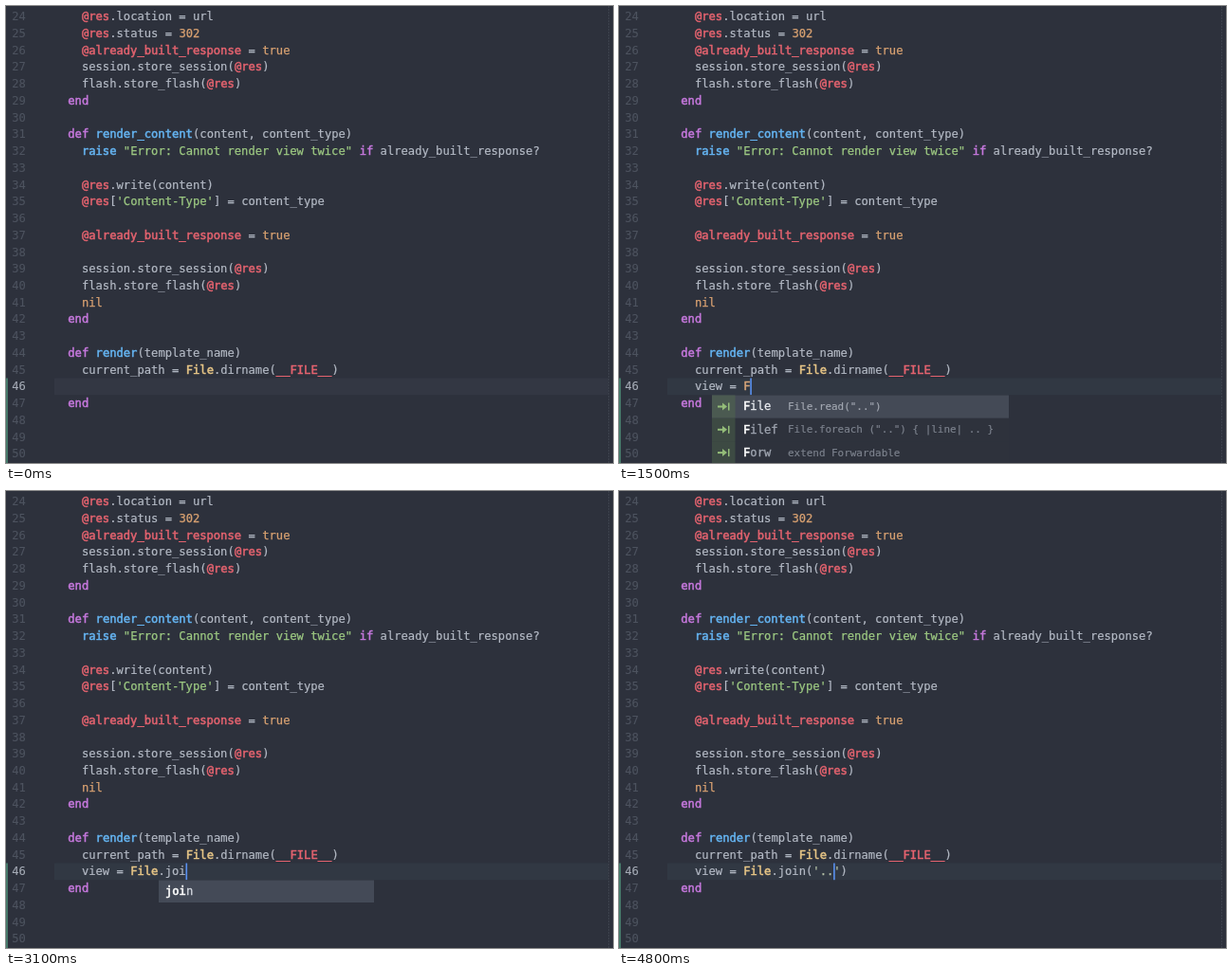
Animation of 640 by 482 pixels, one loop 4.9 s. Source, as an HTML page with a canvas:

```html
<!DOCTYPE html>
<html lang="en">
<head>
<meta charset="utf-8">
<title>Typing in a code editor</title>
<style>
html, body { margin: 0; width: 100%; height: 100%; overflow: hidden; background: #2d313c; }
canvas { display: block; }
</style>
</head>
<body>
<canvas id="stage" width="640" height="482"></canvas>
<script>
const ctx = document.getElementById('stage').getContext('2d');
const LOOP = 4900, CHAR = 7.318, ROW = 17.73, LEFT = 65.3, FIRST = 24, ACTIVE = 46;
const PLAIN = '#b4bac5';
const COLORS = { ivar: '#e4636f', str: '#9dc982', key: '#c678dd', cls: '#e9c787', lit: '#d8a171', fn: '#65b5f3' };
const TOKEN = /(?<ivar>@\w+|__FILE__)|(?<str>".*?"|'.*?')|(?<key>\b(?:def|end|if)\b)|(?<cls>\bF\w*)|(?<lit>\b(?:302|true|nil)\b)|(?<fn>\braise\b|\brender_content\b|\brender(?=\())/g;

const code = `  @res.location = url
  @res.status = 302
  @already_built_response = true
  session.store_session(@res)
  flash.store_flash(@res)
end

def render_content(content, content_type)
  raise "Error: Cannot render view twice" if already_built_response?

  @res.write(content)
  @res['Content-Type'] = content_type

  @already_built_response = true

  session.store_session(@res)
  flash.store_flash(@res)
  nil
end

def render(template_name)
  current_path = File.dirname(__FILE__)

end




`.split('\n').slice(0, 27);

// [start ms, text before the cursor, text after it]
const typing = [
  [0, ''], [300, 'v'], [400, 'vi'], [500, 'vie'], [700, 'view'], [800, 'view '],
  [1100, 'view ='], [1200, 'view = '], [1500, 'view = F'], [1700, 'view = Fi'],
  [1800, 'view = Fil'], [2000, 'view = File'], [2200, 'view = File.'],
  [2700, 'view = File.j'], [2900, 'view = File.jo'], [3100, 'view = File.joi'],
  [3300, 'view = File.join'], [3600, 'view = File.join(', ')'],
  [4200, "view = File.join('", "')"], [4500, "view = File.join('.", "')"],
  [4700, "view = File.join('..", "')"]
];

const snippets = [
  ['File', 'File.read("..")'],
  ['Filef', 'File.foreach ("..") { |line| .. }'],
  ['Forw', 'extend Forwardable']
];

function rect(x, y, w, h, color) {
  ctx.fillStyle = color;
  ctx.fillRect(x, y, w, h);
}

function text(str, x, y, color, weight = 0.2, size = 12.156) {
  ctx.font = size + 'px "DejaVu Sans Mono", monospace';
  ctx.fillStyle = ctx.strokeStyle = color;
  ctx.fillText(str, x, y);
  if (weight) {
    ctx.lineWidth = weight;
    ctx.strokeText(str, x, y);
  }
}

const baseline = row => 15.3 + row * ROW;

function codeLine(line, row, colors = COLORS) {
  const put = (str, col, color, weight) => {
    if (str.trim()) text(str, LEFT + col * CHAR, baseline(row), color, weight);
  };
  let col = 0;
  for (const m of line.matchAll(TOKEN)) {
    const kind = Object.keys(m.groups).find(k => m.groups[k]);
    put(line.slice(col, m.index), col, PLAIN);
    put(m[0], m.index, colors[kind], kind === 'str' || kind === 'lit' ? 0.25 : 0.5);
    col = m.index + m[0].length;
  }
  put(line.slice(col), col, PLAIN);
}

function label(word, matched, x, y, rest) {
  text(word.slice(0, matched), x, y, '#ffffff', 0.6);
  text(word.slice(matched), x + matched * CHAR, y, rest, 0.3);
}

function snippetPopup(prefix) {
  const items = snippets.filter(([word]) => word.startsWith(prefix));
  items.forEach(([word, hint], i) => {
    const y = 410.5 + i * 24.3, mid = y + 12;
    rect(98, y, 313, 24.3, i ? '#2e323c' : '#444a56');
    rect(98, y, 24.5, 24.3, i ? '#3d4a43' : '#4b5a51');
    const green = '#94bd79';
    rect(104, mid - 1, 6, 2, green);
    ctx.beginPath();
    ctx.moveTo(109, mid - 4);
    ctx.lineTo(114, mid);
    ctx.lineTo(109, mid + 4);
    ctx.fill();
    rect(115, mid - 4, 1.5, 8, green);
    label(word, prefix.length, 131, mid + 3.8, i ? '#a0a6b1' : '#eceef2');
    text(hint, 178, mid + 3.5, i ? '#7d838e' : '#a3a8b2', 0.15, 10.93);
  });
}

function methodPopup(prefix) {
  rect(161, 410.5, 227, 23.5, '#444a57');
  label('join', prefix.length, 168, 426.3, '#d5d9e0');
}

function draw(t) {
  const [, before, after = ''] = typing.findLast(step => step[0] <= t);
  const row = ACTIVE - FIRST, top = 392.5;
  rect(0, 0, 640, 482, '#2d313c');
  rect(51, top, 584, 17.7, before ? '#313843' : '#333743');
  for (let y = 0; y < 482; y += 3) rect(635, y, 1, 2, '#3c414c');
  rect(0, top, 2, 90, '#46796a');

  code.forEach((line, i) => {
    text(String(FIRST + i), 6.3, baseline(i), i === row ? '#a5abb6' : '#4d535f', 0.1);
    codeLine(line, i);
  });

  if (!before) return;
  const settled = before.includes('.j');
  codeLine('  ' + before + after, row, { ...COLORS, cls: settled ? COLORS.cls : '#d9a67a', str: '#b3c0a6' });

  const x = LEFT + (before.length + 2) * CHAR;
  if (before.endsWith('(')) rect(x - CHAR, 409, CHAR * 2, 1, '#5a91e8');
  rect(x - 0.2, top, 1.6, 17.7, '#5a91f0');

  const word = before.match(/[\w]*$/)[0];
  if (/^F/.test(word)) snippetPopup(word);
  if (/^j(oi?)?$/.test(word)) methodPopup(word);
}

const start = performance.now();
function tick() {
  draw((performance.now() - start) % LOOP);
  requestAnimationFrame(tick);
}
tick();
</script>
</body>
</html>
```
